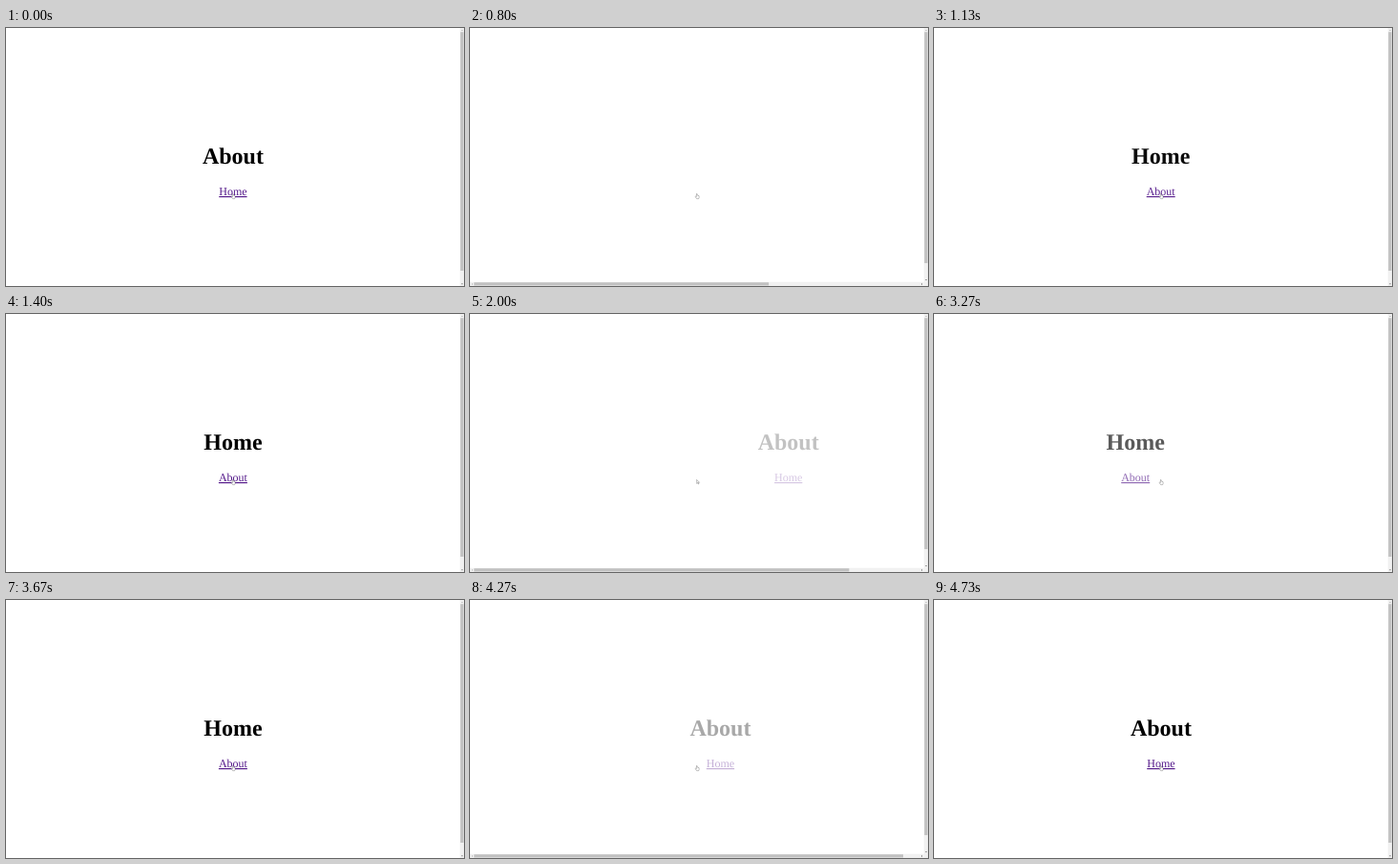
An HTML page that plays this animation: 480x270 px, repeating every 5270 ms.

```html
<!DOCTYPE html>
<html lang="en">
<head>
<meta charset="utf-8">
<title>Page transition</title>
<style>
  html, body { margin: 0; width: 100%; height: 100%; overflow: hidden; background: #fff; }
  svg { display: block; width: 480px; height: 270px; }
  text { font-family: "Liberation Serif", "Times New Roman", serif; text-anchor: middle; text-rendering: geometricPrecision; }
  #title { font-size: 24px; font-weight: bold; }
  #link { font-size: 12px; fill: #551a8b; text-decoration: underline 1.2px; text-underline-offset: .75px; }
  .track { fill: #f1f1f1; }
  .thumb { fill: #c1c1c1; }
  .on { fill: #505050; }
  .off { fill: #a3a3a3; }
  .cursor { fill: #fff; stroke: #000; stroke-linejoin: round; }
</style>
</head>
<body>
<svg viewBox="0 0 480 270">
  <g id="page">
    <text id="title" x="237.9" y="142.1">About</text>
    <text id="link" x="237.9" y="175">Home</text>
  </g>

  <rect class="track" x="475.75" width="4.25" height="270"/>
  <rect class="thumb" id="vThumb" x="476.25" y="4.25" width="3.25"/>
  <path class="off" d="M477 2.7h2l-1-1z"/>
  <path class="on" id="down" d="M477 267.4h2l-1 1z"/>

  <g id="hBar">
    <rect class="track" y="265.75" width="475.75" height="4.25"/>
    <rect class="thumb" id="hThumb" x="4.25" y="266.25" height="3.25"/>
    <path class="off" d="M2.7 267l-1 1l1 1z"/>
    <path class="on" d="M473.2 267l1 1l-1 1z"/>
  </g>

  <path class="cursor" id="hand" transform="translate(236 173.3) scale(.25)"
    d="M5.5 13V2Q5.5 .5 7 .5T8.5 2V7Q11 6 11.5 8Q14 7 14.5 9Q16.5 8.500 16.5 11V16L14.500 21.500H6.500L1 14Q0 11 2.500 11Z"/>
  <path class="cursor" id="arrow" transform="translate(237.5 173.3) scale(.25)"
    d="M.5 .5V16.500L4.300 13L7 19L9.500 18L7 12H12Z"/>
</svg>
<script>
  const LOOP = 5270, STEP = 200 / 3;
  const BAR = 4.25, VIEW_W = 475.75, CONTENT_H = 282.7;
  const FROM = 250, MARGIN = 2, FADE = 0.3, REST = 0.55;

  // click: old page leaves; start: new page begins to move
  const visits = [
    { click: 0, start: -2000, title: 'About', link: 'Home' },
    { click: 800, start: 845, title: 'Home', link: 'About' },
    { click: 1870, start: 1930, title: 'About', link: 'Home', arrow: true },
    { click: 3070, start: 3077, title: 'Home', link: 'About' },
    { click: 4130, start: 4169, title: 'About', link: 'Home' }
  ];

  const $ = id => document.getElementById(id);
  const set = (id, name, value) => $(id).setAttribute(name, value);
  const show = (id, on) => set(id, 'visibility', on ? 'visible' : 'hidden');

  // Underdamped spring: stiffness 500, damping 25, mass 1
  function spring(t) {
    if (t > REST) return 0;
    const decay = 12.5, w = Math.sqrt(500 - decay * decay);
    return FROM * Math.exp(-decay * t) * (Math.cos(w * t) + decay / w * Math.sin(w * t));
  }

  // The picture advances at 15 steps per second, on 10 ms ticks
  function snap(ms) {
    const tick = Math.floor(ms / 10) * 10;
    return Math.round(Math.floor((tick + 3.4) / STEP) * STEP / 10) * 10;
  }

  function draw(ms) {
    const now = snap(ms % LOOP);
    const visit = visits.filter(v => v.click <= now).pop();
    const t = Math.max(0, (now - visit.start) / 1000);
    const x = spring(t);

    $('title').textContent = visit.title;
    $('link').textContent = visit.link;
    set('page', 'transform', `translate(${x.toFixed(3)} 0)`);
    set('page', 'opacity', Math.min(1, t / FADE));

    const wide = x > MARGIN;
    const viewH = wide ? 270 - BAR : 270;
    set('vThumb', 'height', (viewH - 2 * BAR) * viewH / CONTENT_H);
    set('down', 'transform', `translate(0 ${viewH - 270})`);
    show('hBar', wide);
    set('hThumb', 'width', (VIEW_W - 2 * BAR) * VIEW_W / (VIEW_W + Math.max(0, x - 6)));

    const arrow = Boolean(visit.arrow) && t > 0.06 && t < 0.2;
    show('arrow', arrow);
    show('hand', !arrow);
  }

  function loop() {
    draw(performance.now());
    requestAnimationFrame(loop);
  }
  loop();
</script>
</body>
</html>
```
